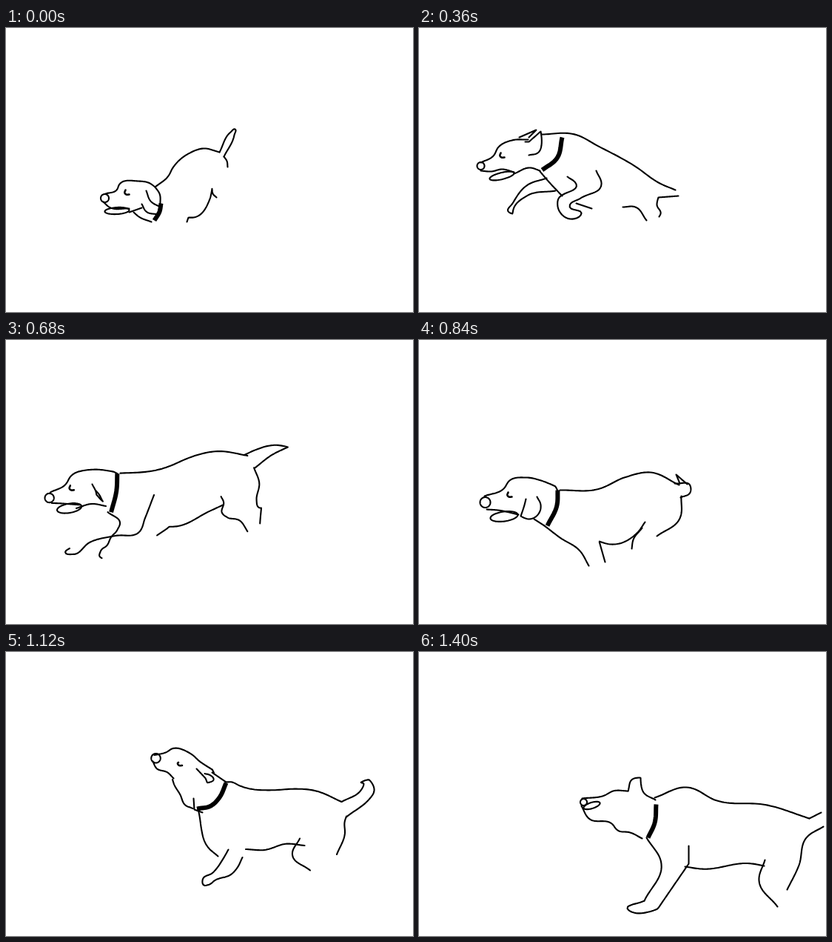
These frames come from a looping animation (550 by 383 pixels, 1440 ms). An HTML page with a canvas:

```html
<!DOCTYPE html>
<html lang="en">
<head>
<meta charset="utf-8">
<title>Running dog</title>
<style>
  html, body { margin: 0; width: 100%; height: 100%; overflow: hidden; background: #fff; }
  canvas { display: block; width: 550px; height: 383px; }
</style>
</head>
<body>
<canvas id="stage" width="550" height="383"></canvas>
<script>
const LOOP = 1440, TICK = 40, SAMPLES = 64;
const HOLD_EVERY = 360, LAST_HOLD = 720; // these drawings stay for two ticks

const mix = (a, b, u) => a + (b - a) * u;
const mixPoint = (p, q, u) => [mix(p[0], q[0], u), mix(p[1], q[1], u)];
const gap = (p, q) => Math.hypot(q[0] - p[0], q[1] - p[1]);
const range = n => Array.from({ length: n }, (_, i) => i);

// An oval whose long axis runs from a to b.
function oval(ax, ay, bx, by, fat) {
  const long = gap([ax, ay], [bx, by]), ux = (bx - ax) / long, uy = (by - ay) / long;
  return range(SAMPLES).map(i => {
    const turn = Math.PI * 2 * i / (SAMPLES - 1);
    const along = long / 2 * (1 - Math.cos(turn)), across = -fat * Math.sin(turn);
    return [ax + ux * along - uy * across, ay + uy * along + ux * across];
  });
}
const nose = (x, y, r) => oval(x - r, y, x + r, y, r);
const eye = (x, y, open) => curve(`${x + 1},${y - open} ${x},${y} ${x + 2},${y + 2} ${x + 6},${y + 2}`);

// Direction at a key point, as on the circle through its neighbours.
function heading(points, i) {
  const p = points[i], a = points[i - 1] || p, b = points[i + 1] || p;
  if (p.sharp) return [0, 0];
  const before = gap(a, p) || 1e-3, after = gap(p, b) || 1e-3;
  const d = [0, 1].map(n => (p[n] - a[n]) / before * after + (b[n] - p[n]) / after * before);
  const length = Math.hypot(...d) || 1;
  return [d[0] / length, d[1] / length];
}

// A smooth pen line through key points; "!" marks a corner.
function curve(text) {
  const points = text.split(' ').map(word =>
    Object.assign(word.split(',').map(parseFloat), { sharp: word.endsWith('!') }));
  const line = [points[0]];
  for (let i = 1; i < points.length; i++) {
    const p = points[i - 1], q = points[i], pull = gap(p, q) * 0.36;
    const d = heading(points, i - 1), e = heading(points, i);
    for (let k = 1; k <= 12; k++) {
      const u = k / 12, v = 1 - u;
      line.push([0, 1].map(n =>
        v * v * v * p[n] + 3 * v * v * u * (p[n] + d[n] * pull) +
        3 * v * u * u * (q[n] - e[n] * pull) + u * u * u * q[n]));
    }
  }
  return resample(line);
}

// Evenly spaced points, so that any two strokes can be blended.
function resample(line) {
  const run = [0];
  for (let i = 1; i < line.length; i++) run.push(run[i - 1] + gap(line[i - 1], line[i]));
  let i = 1;
  return range(SAMPLES).map(k => {
    const s = run[run.length - 1] * k / (SAMPLES - 1);
    while (i < line.length - 1 && run[i] < s) i++;
    return mixPoint(line[i - 1], line[i], Math.min(1, (s - run[i - 1]) / (run[i] - run[i - 1] || 1)));
  });
}

const crouch = {
  nose: nose(133, 229, 5.5),
  eye: eye(160, 222, 4),
  tongue: oval(133, 247, 166, 245, 4.5),
  lip: curve('131,234 139,241 166,243'),
  crown: curve('134,223 149,218 153,210 178,206 194,209 201,214'),
  jaw: curve('166,248 183,242'),
  ear: curve('189,219 195,233 208,241'),
  cheek: curve('183,237 189,247 205,251'),
  nape: curve('201,214 207,223 208,238'),
  neck: curve('172,248 179,254 196,261'),
  collar: curve('209,236 207,247 200,259'),
  back: curve('201,214 219,199 225,188 248,168 266,162 288,167'),
  tail: curve('288,167 303,140 309,136 308,144 294,173'),
  rump: curve('294,173 298,179 299,187'),
  belly: curve('244,261 246,255! 253,255 275,230 278,216! 279,223 284,228')
};

const gather = {
  nose: nose(83, 185.5, 5),
  eye: eye(109, 172, 4),
  tongue: oval(95, 203, 128, 195, 4.5),
  lip: curve('83,192 97,193 112,190 128,194'),
  crown: curve('83,181 100,172 107,160 125,151 147,150'),
  jaw: curve('128,196 150,188 163,192'),
  cheek: curve('135,147 158,137! 148,147'),
  ear: curve('143,153 148,153! 164,139! 160,168 148,171'),
  collar: curve('193,147 186,175 166,191'),
  back: curve('165,143 210,143 242,159 290,185 325,209 346,218'),
  rump: curve('350,226 323,228! 321,238 326,250 324,254'),
  chest: curve('163,193 175,207 193,226'),
  reach: curve('172,202 145,212 126,236 120,247 126,250! 127,244 145,226 184,219'),
  foreleg: curve('200,200 212,210 187,232 190,248 208,257 219,250 203,240 218,229 246,211 239,192'),
  elbow: curve('212,236 233,243'),
  hind: curve('275,241 292,241 307,259')
};

const stretch = {
  nose: nose(35, 208, 5.5),
  eye: eye(60, 193, 4),
  tongue: oval(48, 221, 78, 215, 6),
  lip: curve('39,213 60,213 74,212'),
  crown: curve('38,201 55,190 61,179 90,165 122,162'),
  jaw: curve('72,222 93,216 112,219'),
  ear: curve('95,179 110,186 107,204 92,196'),
  collar: curve('122,163 121,190 118,218'),
  back: curve('127,162 150,160 192,151 240,133 285,126 307,126'),
  tail: curve('303,126 325,114 360,103 391,103! 360,112 323,142'),
  rump: curve('320,143 332,165 329,194 336,205 350,205! 359,234'),
  belly: curve('168,236 205,236 262,207 285,204'),
  hind: curve('282,179 290,190 289,211 303,219 337,221 355,240'),
  foreleg: curve('113,218 132,234 120,246 90,259 76,270 54,276 50,284 54,286'),
  forearm: curve('63,276 57,281 68,284 90,268 125,259 157,254 165,235 177,204')
};

const land = {
  nose: nose(89, 218.5, 7),
  eye: eye(119, 209, 4),
  tongue: oval(96, 240, 133, 235, 6.5),
  lip: curve('91,228 106,229 134,235'),
  crown: curve('88,210 114,200 122,189 145,185 184,197! 187,203'),
  ear: curve('144,214 142,222 137,237! 148,241 161,234 164,222 159,211'),
  neck: curve('155,241 169,250'),
  collar: curve('187,202 186,222 173,250'),
  back: curve('190,202 240,201 280,184 312,178 351,195'),
  tail: curve('345,193 366,196 366,205 353,212'),
  tip: curve('362,194 347,181! 352,193'),
  rump: curve('354,210 352,240 321,264'),
  belly: curve('251,299 243,271! 258,275 294,260 305,245'),
  hind: curve('301,253 289,269 287,281'),
  foreleg: curve('169,250 190,266 217,284 229,304')
};

const trot = {
  nose: nose(179, 155.5, 5.5),
  eye: eye(214, 150, 4),
  tongue: oval(183, 182, 219, 180, 7),
  lip: curve('178,160 183,171 208,171 219,179'),
  crown: curve('180,151 202,144 210,133 247,132 262,147 283,162! 284,169'),
  jaw: curve('218,185 231,189 238,198'),
  ear: curve('237,158 245,176 253,194! 269,177 264,157 254,151'),
  collar: curve('285,169 276,192 262,204 238,200'),
  back: curve('285,169 325,191 365,196 395,203 419,221'),
  tail: curve('419,221 455,220 474,228 481,224! 478,236 450,236 424,241'),
  rump: curve('424,239 422,258 409,289'),
  belly: curve('322,265 340,265 368,256 377,272 374,288'),
  chest: curve('238,198 240,232 258,258 283,268'),
  reach: curve('239,232 205,241 194,263 180,280 183,289 191,290'),
  forearm: curve('188,279 193,286 200,265 225,251 250,246'),
  elbow: curve('271,255 290,271 285,294'),
  foreleg: curve('309,250 319,263! 304,300')
};

const raise = {
  nose: nose(225, 130, 7),
  eye: eye(249, 151, 0),
  lip: curve('218,134 233,161'),
  crown: curve('220,126 236,125 251,141 277,156'),
  jaw: curve('231,158 232,172 240,195 248,218 266,223'),
  ear: curve('277,156 289,154! 289,172 282,176'),
  cheek: curve('265,203 266,218! 277,222'),
  neck: curve('290,168 309,181'),
  collar: curve('309,183 298,202 277,222'),
  back: curve('309,181 317,177 330,181 380,178 430,171 487,182'),
  tail: curve('487,182 513,155 508,134 485,122! 489,120 518,131 523,160 495,203'),
  rump: curve('495,203 491,210 494,228 484,256'),
  belly: curve('325,266 365,268 410,250 432,233'),
  hind: curve('432,233 422,255 446,276'),
  chest: curve('280,224 286,235 285,265 289,282'),
  foreleg: curve('291,282 275,301 240,333 213,346 215,357 232,354 250,338 300,310 316,290 334,253')
};

const stalk = {
  nose: nose(222, 202, 4.5),
  tongue: oval(222, 210, 244, 203, 4),
  crown: curve('220,197 250,193 262,187 282,187'),
  jaw: curve('219,207 229,224 260,231 268,240 285,243 301,251'),
  ear: curve('282,187 288,171 299,169! 303,189 319,199'),
  collar: curve('320,205 318,230 309,250'),
  back: curve('318,196 362,182 402,200 470,206 527,224'),
  tail: curve('527,224 543,216'),
  rump: curve('546,235 523,250 513,287 497,320'),
  belly: curve('359,289 380,292 450,285 466,288'),
  hind: curve('467,280 459,308 484,343'),
  chest: curve('307,250 327,285 304,335'),
  foreleg: curve('304,335 282,347 290,351 322,346! 364,285! 364,261')
};

const keys = [
  { at: 0, pose: crouch },
  { at: 360, pose: gather },
  { at: 560, pose: stretch },
  { at: 840, pose: land },
  { at: 1000, pose: trot },
  { at: 1240, pose: raise },
  { at: 1400, pose: stalk },
  { at: LOOP, pose: crouch }
];

const ctx = document.getElementById('stage').getContext('2d');
const WIDTHS = { collar: 6, eye: 2.6 };
ctx.lineJoin = 'round';

function drawLine(name, line) {
  ctx.lineCap = name === 'collar' ? 'butt' : 'round';
  ctx.lineWidth = WIDTHS[name] || 2.1;
  ctx.beginPath();
  for (const [x, y] of line) ctx.lineTo(x + 0.5, y + 0.5);
  ctx.stroke();
}

// A stroke that only one pose has travels with the nearest main part.
function follow(line, own, other, u) {
  const anchor = ['nose', 'back', 'rump'].reduce((best, part) =>
    gap(own[part][0], line[0]) < gap(own[best][0], line[0]) ? part : best);
  const a = own[anchor][0], b = other[anchor][0];
  return line.map(([x, y]) => [x + (b[0] - a[0]) * u, y + (b[1] - a[1]) * u]);
}

function draw(time) {
  let t = Math.floor((time % LOOP) / TICK) * TICK;
  if (t % HOLD_EVERY === TICK && t <= LAST_HOLD + TICK) t -= TICK;
  const next = keys.findIndex(key => key.at > t);
  const { at, pose: from } = keys[next - 1], to = keys[next].pose;
  const u = (t - at) / (keys[next].at - at);

  ctx.fillStyle = '#fff';
  ctx.fillRect(0, 0, 550, 383);
  ctx.strokeStyle = '#000';
  for (const name of new Set([...Object.keys(from), ...Object.keys(to)])) {
    const a = from[name], b = to[name];
    if (a && b) drawLine(name, a.map((p, i) => mixPoint(p, b[i], u)));
    else if (a && u < 0.5) drawLine(name, follow(a, from, to, u));
    else if (b && u >= 0.5) drawLine(name, follow(b, to, from, 1 - u));
  }
}

const start = performance.now();
function loop() {
  draw(performance.now() - start);
  requestAnimationFrame(loop);
}
loop();
</script>
</body>
</html>
```
